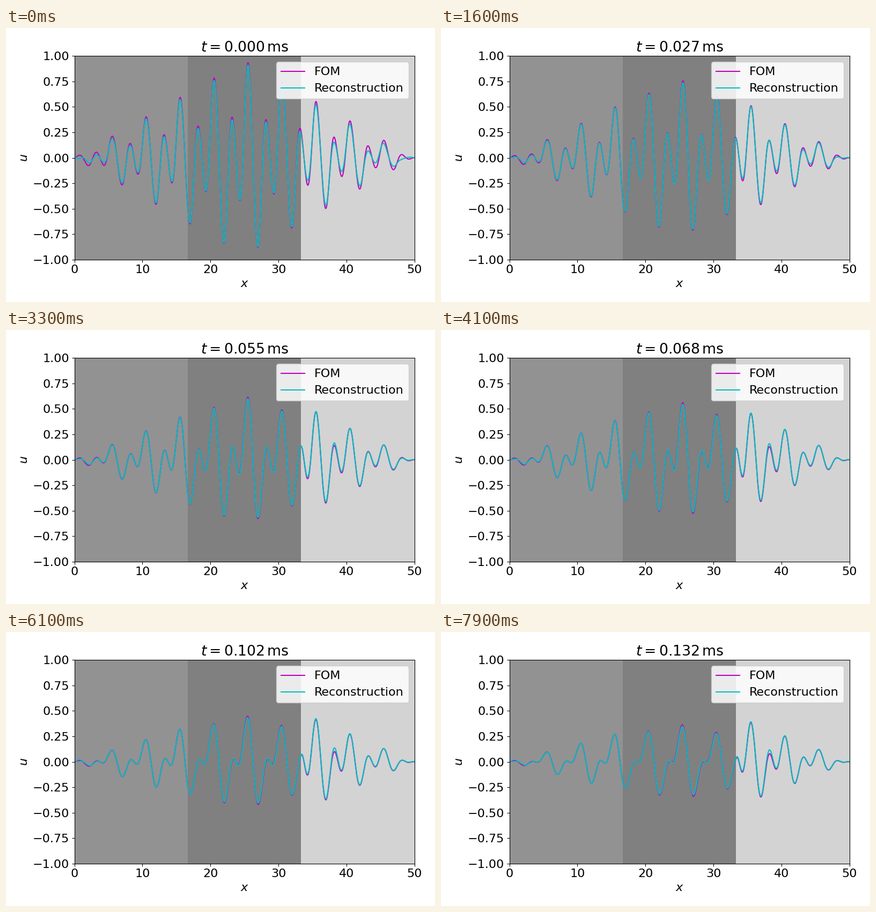
These frames come from a looping animation (800x512 px, 8 s). A matplotlib script:

```python
import numpy as np
import matplotlib.pyplot as plt
from matplotlib.animation import FuncAnimation

FRAMES = 80
LENGTH = 50
EDGES = (LENGTH / 3, 2 * LENGTH / 3)
RATES = (0.82, 1.0, 0.36)  # relative diffusion speed of each layer

x = np.linspace(0, LENGTH, 1201)
theta = 2 * np.pi * x / 5
wave, ripple = np.cos(theta), np.sin(2 * theta)
envelope = 1 - np.abs(x - 25) / 25


def step(edge):
    return 0.5 * (1 + np.tanh((x - edge) / 0.5))


def bell(center, width):
    return np.exp(-((x - center) / width) ** 2 / 2)


right = step(EDGES[1])
rate = (RATES[0] + (RATES[1] - RATES[0]) * step(EDGES[0])
        + (RATES[2] - RATES[1]) * right)

# Reconstruction error: damped ripples at first, a small smooth misfit later
taper = np.minimum(1, (LENGTH - x) / 2)
start_gap = 0.02 * np.exp(-x / 0.6)
early = (start_gap - 0.01 * bell(23, 6) + 0.012 * right * taper * wave
         - (0.015 + 0.025 * np.exp(-x / 5) + 0.027 * right) * taper * ripple)
late = (start_gap - 0.02 * np.exp(-x / 2) * ripple
        - 0.018 * bell(26.5, 4) * wave * (1 - right)
        + 0.033 * bell(38.2, 0.5)
        + 0.012 * right * np.exp(-(x - EDGES[1]) / 8))


def full_model(t):
    tau = rate * t
    slow = 0.36 + 0.1 * tau - 5.7 * tau ** 2
    fast = 0.68 * np.exp(-11.4 * tau)
    sharp = 0.025 * np.exp(-45 * tau)
    return envelope * (slow * wave + fast * ripple
                       + sharp * np.sin(4 * theta))


def error(t):
    fade = np.exp(-t / 0.03)
    return fade * early + (1 - fade) * late


def caption(t):
    return rf"$t = {t:.3f}\,\mathrm{{ms}}$"


plt.rcParams.update({"font.size": 16, "font.family": "DejaVu Sans"})
fig, ax = plt.subplots(figsize=(8, 5.12), dpi=100)

bounds = (0, *EDGES, LENGTH)
for a, b, color in zip(bounds, bounds[1:], ("#929292", "gray", "lightgray")):
    ax.axvspan(a, b, facecolor=color, edgecolor="none", linewidth=0)

fom, = ax.plot(x, full_model(0), "m", label="FOM")
rec, = ax.plot(x, full_model(0) + error(0), "c", label="Reconstruction")
ax.set(xlim=(0, LENGTH), ylim=(-1, 1), xlabel="$x$", ylabel="$u$")
ax.set_yticks(np.linspace(-1, 1, 9))
ax.legend(loc="upper right", framealpha=0.85)
title = ax.set_title(caption(0))
fig.tight_layout()


def update(i):
    t = i / 600
    u = full_model(t)
    fom.set_ydata(u)
    rec.set_ydata(u + error(t))
    title.set_text(caption(t))
    return fom, rec, title


anim = FuncAnimation(fig, update, frames=FRAMES, interval=100,
                     repeat=True, repeat_delay=0)
plt.show()
```
